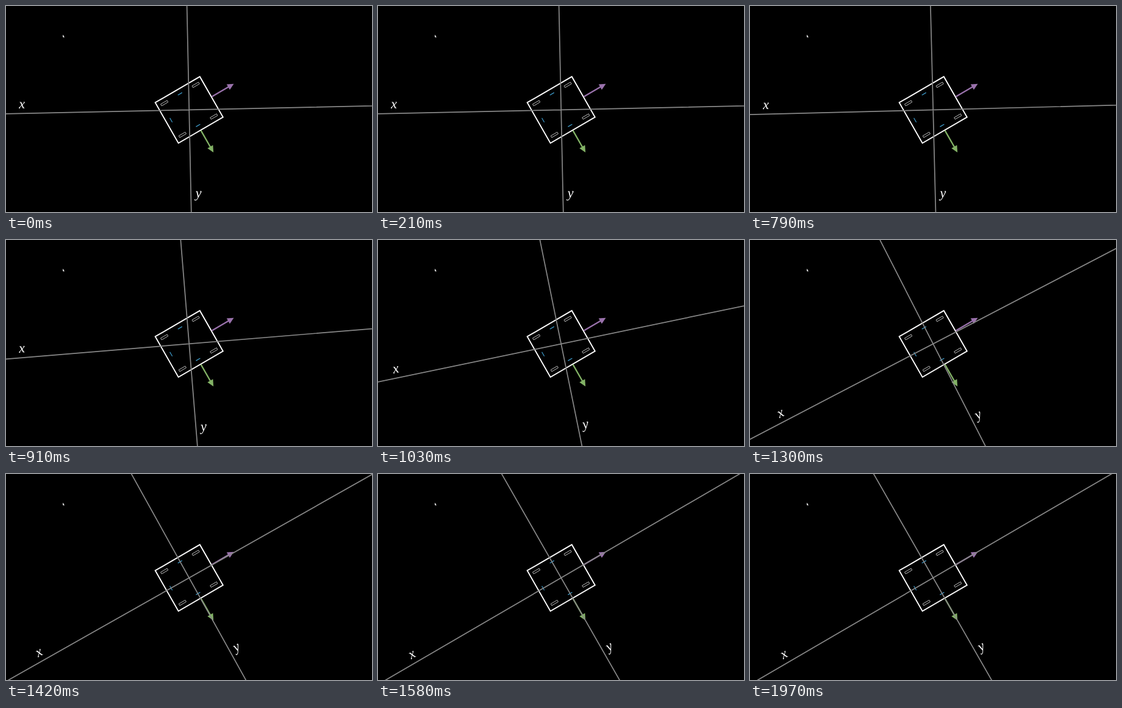
An HTML page for the animation above (2.06 s loop, 600 by 338 pixels).

```html
<!DOCTYPE html>
<html lang="en">
<head>
<meta charset="utf-8">
<title>Rotating axes</title>
<style>
  html, body { margin: 0; width: 100%; height: 100%; overflow: hidden; background: #000; }
  svg { display: block; width: 600px; height: 338px; }
  text { font: italic 22.5px "Liberation Serif", "Noto Serif", serif; fill: #fff; text-anchor: middle; }
</style>
</head>
<body>
<svg viewBox="0 0 600 338">
  <g transform="translate(300.2 170.4) scale(1 1.01)" fill="none">
    <g id="robot" transform="rotate(-30)">
      <rect x="-42.2" y="-38" width="84.4" height="76" stroke="#fff" stroke-width="1.9"/>
      <g id="wheels" stroke="#d0d0d0" stroke-width=".8"></g>
      <path d="M-4 -30H4M-4 29.4H4M-34 -4.3V3.7" stroke="#3f9fd0" stroke-width="1.2"/>
      <path d="M43 0H76" stroke="#9a72ac" stroke-width="2.3"/>
      <path d="M84.6 0L74 -5.2V5.2Z" fill="#9a72ac"/>
      <path d="M0 38.8V71" stroke="#83b366" stroke-width="2.3"/>
      <path d="M0 79.8L-5.2 69.2H5.2Z" fill="#83b366"/>
    </g>
    <g id="axes">
      <path d="M-450 0H450M0 -450V450" stroke="#888" stroke-width="1.7"/>
      <text x="-273.9" y="-8.3">x</text>
      <text x="12.6" y="142.7">y</text>
    </g>
  </g>
  <path d="M93 47V51.6L94.1 50.7L94.9 52.3L95.6 51.9L94.9 50.4H96Z" fill="#ddd"/>
</svg>
<script>
const LOOP = 2060, STEP = 30;
const MOVE_AT = 790, SECOND_STEP = 850;
const TURN_START = 575, TURN_TIME = 1000;
const START_ANGLE = 1.23, END_ANGLE = 30;

const axes = document.getElementById("axes");
const wheels = document.getElementById("wheels");

for (const x of [-29.7, 29.7]) {
  for (const y of [-29.7, 29.7]) {
    const wheel = document.createElementNS("http://www.w3.org/2000/svg", "rect");
    const box = { x: x - 6.1, y: y - 1.6, width: 12.2, height: 3.2 };
    for (const key in box) wheel.setAttribute(key, box[key]);
    wheels.append(wheel);
  }
}

const sigmoid = v => 1 / (1 + Math.exp(-v));

// Sigmoid ease, rescaled to run exactly from 0 to 1.
function smooth(t) {
  const u = Math.min(1, Math.max(0, t));
  const low = sigmoid(-5);
  return (sigmoid(10 * (u - 0.5)) - low) / (1 - 2 * low);
}

function angleAt(ms) {
  if (ms < MOVE_AT) return START_ANGLE;
  const held = ms < SECOND_STEP
    ? MOVE_AT
    : MOVE_AT + Math.floor((ms - MOVE_AT) / STEP) * STEP;
  return END_ANGLE * smooth((held - TURN_START) / TURN_TIME);
}

function draw(ms) {
  axes.setAttribute("transform", `rotate(${-angleAt(ms)})`);
}

const start = performance.now();
function tick() {
  draw((performance.now() - start) % LOOP);
  requestAnimationFrame(tick);
}
tick();
</script>
</body>
</html>
```
